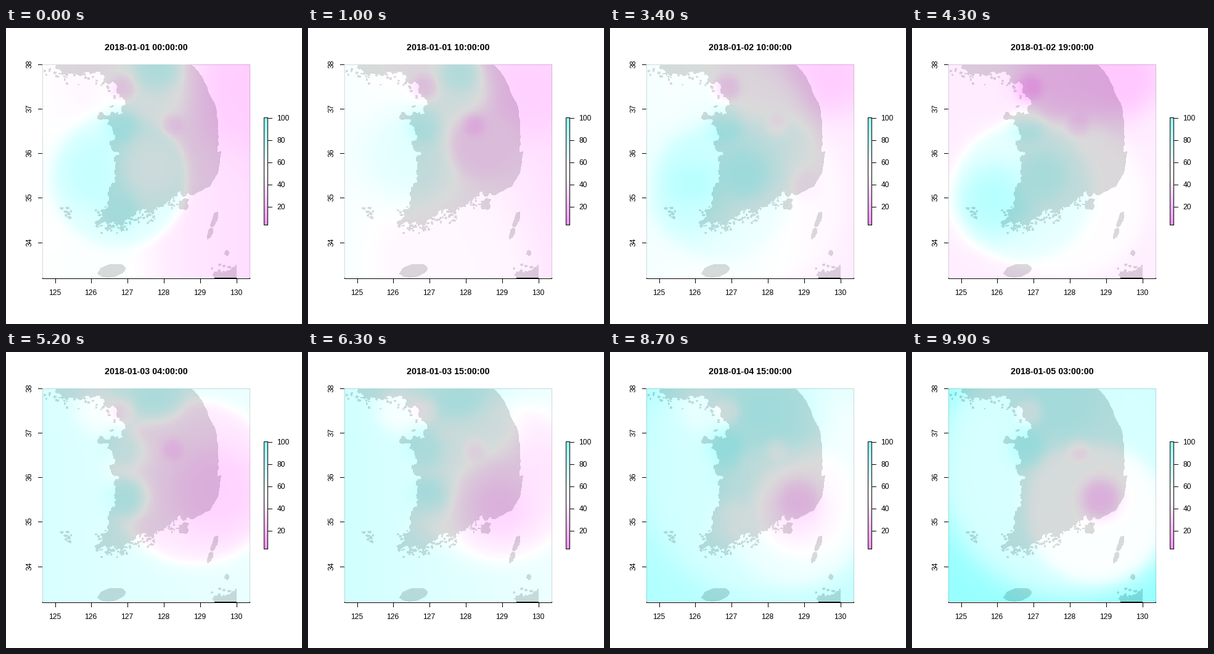
Write a matplotlib script that moves like this. It is 480 px wide and 480 px high and loops after 10000 ms.

```python
import random

import matplotlib.pyplot as plt
import numpy as np
from matplotlib.animation import FuncAnimation

SIZE, FRAMES, STEP = 480, 100, 100
LEFT, RIGHT, TOP, BOTTOM = 59, 396, 59, 405
COLS, ROWS = 115, 96     # raster cells
PX = 0.72                # points per pixel at 100 dpi
ALPHA = 0.86             # opacity of the humidity raster

plt.rcParams["font.family"] = "Liberation Sans"
rng = random.Random(18)

fig = plt.figure(figsize=(4.8, 4.8), dpi=100, facecolor="white")
ax = fig.add_axes([0, 0, 1, 1])


# ---- land, drawn black below the translucent raster --------------------------
def rough(points, amount, depth=4):
    """Midpoint displacement along an open line."""
    for _ in range(depth):
        out = [points[0]]
        for (x0, y0), (x1, y1) in zip(points, points[1:]):
            k = rng.uniform(-amount, amount)
            out += [((x0 + x1) / 2 - k * (y1 - y0),
                     (y0 + y1) / 2 + k * (x1 - x0)), (x1, y1)]
        points = out
    return points


def land(points):
    xy = np.clip(np.array(points), (LEFT, TOP), (RIGHT - 1, 406))
    ax.fill(xy[:, 0], xy[:, 1], color="black", lw=0, aa=False, zorder=1)


def island(x, y, rx, ry, tilt=0.0, jag=0.25):
    a = np.linspace(0, 2 * np.pi, 16, endpoint=False)
    r = np.array([1 + rng.uniform(-jag, jag) for _ in a])
    px, py = r * np.cos(a) * rx, r * np.sin(a) * ry
    c, s = np.cos(tilt), np.sin(tilt)
    land(np.column_stack((x + px * c - py * s, y + px * s + py * c)))


east = [(299, 59), (324, 92), (341, 130), (344, 174), (342, 203), (349, 200),
        (344, 232), (331, 256), (303, 271)]
south = [(303, 271), (268, 277), (240, 286), (234, 299), (205, 306),
         (186, 320), (167, 318)]
west = [(167, 318), (160, 296), (167, 260), (178, 238), (175, 214), (185, 204),
        (168, 186), (172, 160), (151, 148), (152, 137), (190, 140), (185, 112),
        (167, 90), (158, 76), (130, 70), (105, 74), (82, 66), (86, 59)]
land(rough(east, 0.08) + rough(south, 0.35) + rough(west, 0.32))

island(171.5, 393.5, 22, 10, -0.2, 0.06)       # southern island
island(338, 311, 4, 12, 0.3)                   # strait islands
island(331, 332, 3.5, 9, 0.3)
island(358, 365, 3, 4)
island(289, 286, 7, 8, 0.4, 0.4)
island(154, 313, 8, 4, -0.5, 0.4)
land(rough([(374, 384), (362, 394), (338, 405)], 0.4) + [(338, 406), (374, 406)])

# islets strewn along the drowned coasts and in two groups offshore
for x, y in south[1:] * 2 + west[:2] * 2 + west[-7:]:
    for _ in range(7):
        island(rng.gauss(x, 9), rng.gauss(y + 4, 6),
               rng.uniform(0.6, 2.2), rng.uniform(0.6, 1.7))
for x, y in [(100, 300), (358, 390)]:
    for _ in range(9):
        island(rng.gauss(x, 7), rng.gauss(y, 4), rng.uniform(0.8, 3), 1.5)


# ---- humidity: -1 is magenta, 0 white, +1 cyan -------------------------------
X, Y = np.meshgrid(LEFT + (np.arange(COLS) + 0.5) * (RIGHT - LEFT) / COLS,
                   TOP + (np.arange(ROWS) + 0.5) * (BOTTOM - TOP) / ROWS)


def disc(x, y, r, soft=0.22):
    d = np.hypot(X - x, Y - y) / r
    return 0.5 - 0.5 * np.tanh((d - 1) / (2 * soft))


# dry city and valley, damp western cape: the same at all hours
LOCAL = (0.25 * disc(186, 157, 28) - 0.28 * disc(190, 97, 20)
         - 0.18 * disc(270, 158, 16))


def field(west, east_end, *spots):
    """West-east slope with discs (x, y, radius, value[, softness]) over it."""
    u = west + (east_end - west) * (X - LEFT) / (RIGHT - LEFT)
    for x, y, r, value, *soft in spots:
        u += (value - u) * disc(x, y, r, *soft)
    return u + LOCAL


KEYS = {
    0: field(0, -0.3, (395, 100, 95, -0.45), (150, 395, 80, 0.03),
             (225, 105, 65, 0.08), (183, 247, 108, 0.26, 0.05),
             (150, 235, 58, 0.52), (235, 225, 46, 0.12),
             (185, 300, 28, 0.5), (245, 62, 36, 0.4)),
    10: field(0.06, -0.27, (350, 100, 80, -0.42), (240, 390, 120, -0.06),
              (165, 205, 75, 0.25), (240, 105, 50, 0.12),
              (285, 190, 54, -0.28, 0.14), (246, 72, 28, 0.36)),
    24: field(0.35, -0.15, (370, 70, 80, -0.42), (215, 160, 105, 0.42, 0.12),
              (130, 220, 58, 0.72), (220, 235, 38, 0.66),
              (322, 256, 24, -0.2)),
    43: field(-0.15, -0.14, (260, 75, 85, -0.46), (345, 80, 58, -0.5),
              (250, 280, 130, -0.01, 0.06), (180, 265, 110, 0.22, 0.06),
              (135, 280, 55, 0.65), (212, 240, 38, 0.46)),
    52: field(0.35, 0.18, (150, 95, 35, 0.05), (305, 210, 133, -0.18, 0.06),
              (340, 225, 72, -0.4), (245, 66, 40, 0.42),
              (190, 235, 34, 0.46), (200, 165, 32, 0)),
    77: field(0.5, 0.12, (150, 95, 35, 0.06), (385, 150, 70, -0.13),
              (260, 115, 72, 0.55), (200, 212, 36, 0.56),
              (198, 278, 32, 0.16), (312, 255, 78, -0.06, 0.1),
              (305, 258, 44, -0.38)),
    99: field(0.95, 0.95, (255, 185, 212, 0.36, 0.06), (235, 75, 65, 0.5),
              (298, 262, 112, 0.02, 0.06), (240, 210, 46, 0.04),
              (306, 238, 30, -0.4)),
}
HOURS = list(KEYS)


def humidity(i):
    a, b = next((a, b) for a, b in zip(HOURS, HOURS[1:]) if i <= b)
    t = (i - a) / (b - a)
    return (1 - t) * KEYS[a] + t * KEYS[b]


def colors(u):
    s = np.clip(u, -1, 1) / 2
    rgba = np.ones(u.shape + (4,))
    rgba[..., 0] = 1 - np.maximum(s, 0)
    rgba[..., 1] = 1 + np.minimum(s, 0)
    rgba[..., 3] = ALPHA
    return rgba


# ---- frame, axes and colour bar ----------------------------------------------
def bar(x, y, w, h, z=3):
    ax.add_patch(plt.Rectangle((x, y), w, h, color="black", lw=0, aa=False,
                               zorder=z))


def frame(x0, y0, x1, y1, z):
    for y in (y0, y1):
        bar(x0, y, x1 - x0 + 1, 1, z)
    for x in (x0, x1):
        bar(x, y0, 1, y1 - y0 + 1, z)


def label(x, y, s, size=12, **kw):
    return ax.text(x, y, s, fontsize=size * PX, color="black", **kw)


def raster(u, x0, x1, y0, y1):
    return ax.imshow(colors(u), extent=(x0, x1, y1, y0),
                     interpolation="nearest", zorder=2)


image = raster(KEYS[0], LEFT, RIGHT, TOP, BOTTOM)
raster(np.linspace(1, -1, 174)[:, None], 418, 425, 145, 319)
frame(LEFT, TOP, RIGHT - 1, 406, 0)
bar(LEFT, 406, RIGHT - LEFT, 1)
frame(418, 145, 424, 319, 3)

for k in range(6):
    x = int(80 + 58.8 * k)
    bar(x, 406, 1, 8)
    label(x - 0.5, 433, str(125 + k), ha="center", va="baseline")
for k in range(5):
    y = int(59 + 72.3 * k)
    bar(52, y, 7, 1)
    label(39, y - 0.3, str(38 - k), rotation=90, ha="center", va="center")
    y = int(146 + 36.2 * k)
    bar(425, y, 7, 1)
    label(439.5, y + 4, str(100 - 20 * k), va="baseline")

title = label(227, 36, "", 14.2, weight="bold", ha="center", va="baseline")

ax.set_aspect("auto")
ax.set_xlim(0, SIZE)
ax.set_ylim(SIZE, 0)
ax.axis("off")


def update(i):
    image.set_data(colors(humidity(i)))
    title.set_text(f"2018-01-{1 + i // 24:02d} {i % 24:02d}:00:00")
    return image, title


anim = FuncAnimation(fig, update, frames=FRAMES, interval=STEP,
                     repeat=True, repeat_delay=0, blit=False)
plt.show()
```
